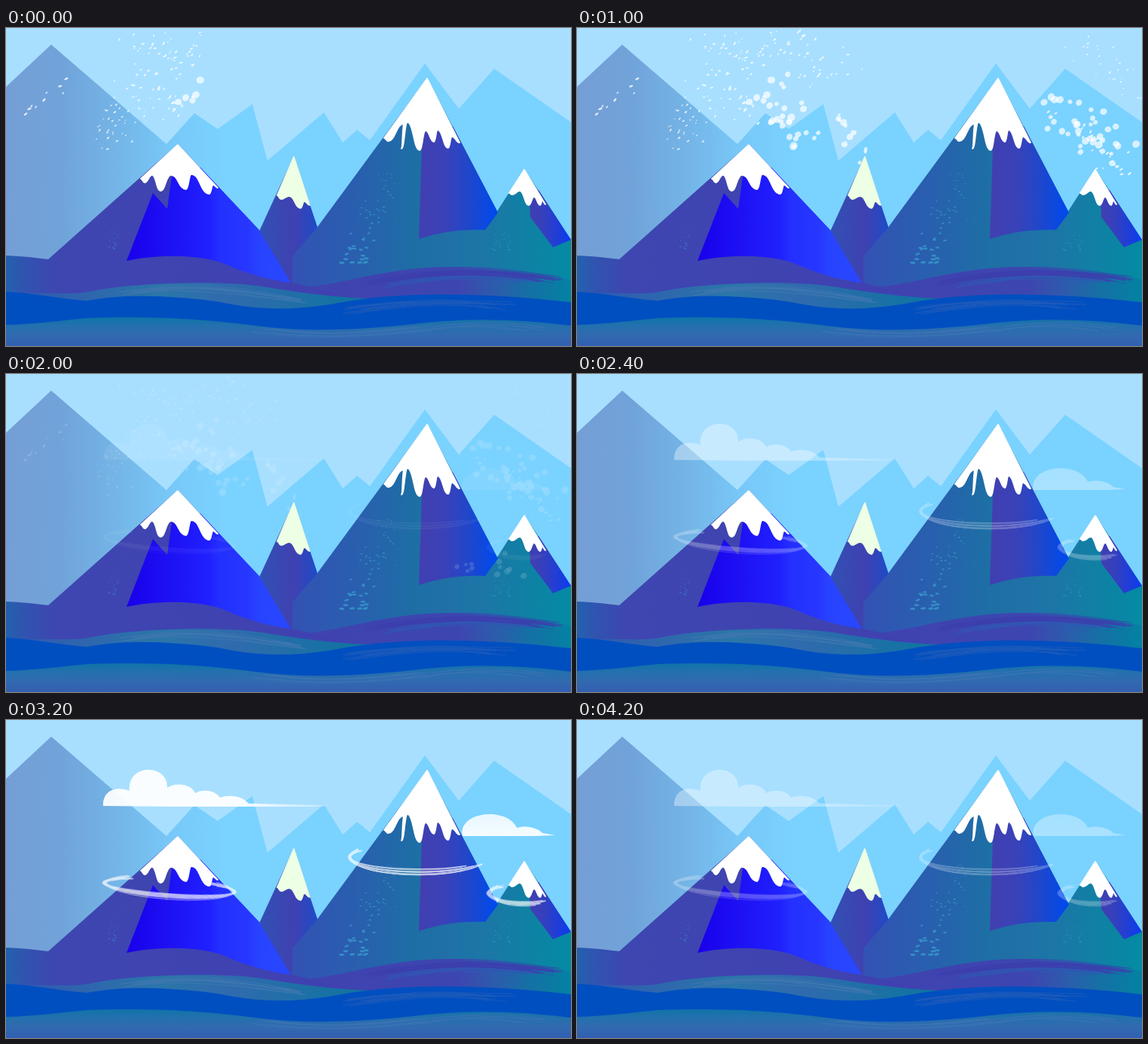
Recreate the animation shown at these times as an HTML page. Size 750 by 422 pixels, loop 4.4 s.

```html
<!DOCTYPE html>
<html lang="en">
<head>
<meta charset="utf-8">
<title>Mountains</title>
<style>
html, body { margin: 0; width: 100%; height: 100%; overflow: hidden; background: #a8dfff; }
svg { display: block; width: 750px; height: 422px; }
</style>
</head>
<body>
<svg viewBox="0 0 750 422" xmlns="http://www.w3.org/2000/svg">
  <defs id="defs"></defs>
  <rect width="750" height="422" fill="#a8dfff"/>
  <path fill="url(#range)" d="M0 78L60 22L213 154L250 113L281 134L327 101L347 176L422 112L447 152L466 135L483 149L556 47L601 107L648 54L750 125V422H0Z"/>

  <path fill="url(#mid)" d="M382 170L336 270L376 340L430 320L414 266Z"/>
  <path fill="url(#body)" d="M559 66L412 266L380 303V345H750V281L688 187L636 268L653 245Z"/>
  <path fill="url(#bigSide)" d="M553 130L548 280C580 270 605 267 636 268L653 245L593 130Z"/>
  <path fill="url(#smallSide)" d="M694 215L696 251L726 291L750 281L707 215Z"/>
  <path fill="url(#ribbon)" d="M376 346C450 342 500 317 590 317C650 316 700 322 750 334V375H376Z"/>
  <path fill="url(#left)" d="M0 302C30 303 52 307 68 308L56 307L228 154L336 268L380 338L480 362V375H0Z"/>
  <path fill="url(#face)" d="M160 309L195 219L214 240L221 190L258 185L336 268L378 338C352 335 322 327 290 313C255 299 195 301 160 309Z"/>
  <g id="caps" stroke-width="1.8" stroke-linejoin="round"></g>

  <path fill="url(#teal)" d="M20 352C60 351 90 354 110 350C170 337 290 335 340 343C400 353 440 357 480 359V382H20Z"/>
  <g id="brushBack"></g>
  <path fill="#004fc0" d="M0 350C40 352 70 359 107 362C160 352 220 355 280 363C350 378 400 372 440 365C520 350 620 350 750 364V422H0Z"/>
  <path fill="url(#front)" d="M0 394C40 393 75 388 107 385C200 382 270 387 330 395C400 404 470 401 540 393C610 384 680 386 750 395V422H0Z"/>
  <g id="brushFront"></g>
  <g id="specks" fill="#3a9fce" opacity=".75"></g>

  <g id="snow" fill="#fff"></g>
  <g id="clouds">
    <path fill="#fff" d="M129 114C128 96 143 86 164 94C162 78 173 66 189 66C205 66 215 77 214 90C226 82 246 85 251 97C260 91 279 93 284 103C296 98 316 101 323 112V114Z"/>
    <path fill="url(#tail)" d="M315 110.5L432 113.5L410 115H130L315 113Z"/>
    <path fill="url(#puff)" d="M606 154C602 137 620 125 641 125C661 125 674 133 678 143C691 139 706 143 712 150L729 153L700 154Z"/>
    <g id="rings" fill="none" stroke="#fff" stroke-linecap="round" opacity=".75"></g>
  </g>
</svg>
<script>
const $ = id => document.getElementById(id);
const clamp = v => Math.max(0, Math.min(1, v));
const mix = (a, b, t) => a + (b - a) * t;

let seed = 7;
const rnd = () => (seed = (seed * 16807) % 2147483647) / 2147483647;
const span = (a, b) => mix(a, b, rnd());
const bell = () => rnd() + rnd() - rnd() - rnd();
const repeat = (n, fn) => Array.from({ length: n }, fn).join('');

// Each stop is written offset:colour
const gradient = (id, from, to, stops, axis = 'x') => {
  const cross = axis === 'x' ? 'y' : 'x';
  const inner = stops.split(' ').map(s => {
    const [at, color] = s.split(':');
    return `<stop offset="${at}" stop-color="${color}"/>`;
  }).join('');
  return `<linearGradient id="${id}" gradientUnits="userSpaceOnUse" ${axis}1="${from}" ${axis}2="${to}" ${cross}1="0" ${cross}2="0">${inner}</linearGradient>`;
};
$('defs').innerHTML = [
  gradient('range', 0, 290, '0:#759ed6 .25:#70a3d9 .5:#74b4e6 .75:#77c8f8 1:#7ad2ff'),
  gradient('mid', 336, 414, '0:#3051b4 .58:#4041b1 1:#1d4bc8'),
  gradient('body', 380, 750, '0:#3352b4 .25:#2860ae .45:#1d6fa5 .55:#2070a7 .7:#1b77a6 1:#048ba3'),
  gradient('bigSide', 548, 650, '0:#423fb0 .35:#3942b8 .65:#1f47cb 1:#0049ed'),
  gradient('smallSide', 694, 750, '0:#423fb0 .35:#3540bd 1:#0a3bf0'),
  gradient('ribbon', 376, 750, '0:#4042b0 .6:#3d46b0 .74:#2b5dac .85:#1570a5 1:#0382a2'),
  gradient('left', 0, 400, '0:#2361ae .06:#3054b0 .16:#3e46b0 1:#4041b1'),
  gradient('face', 160, 378, '0:#1900ea .25:#1d10f4 .5:#2020fe .57:#2330ff .74:#2737ff .8:#2843ff 1:#2848ff'),
  gradient('teal', 20, 480, '0:#3158b2 .4:#2a76a9 .6:#306aae 1:#0d75a0'),
  gradient('front', 384, 422, '0:#0f74a8 .3:#2470ae .65:#3269b0 1:#315fb1', 'y'),
  gradient('tail', 315, 432, '0:#fff .4:#e6f6ff 1:#c5eaff'),
  gradient('puff', 125, 154, '0:#f1faff 1:#fff', 'y')
].join('');

// Snow cap: apex, then the turning points of the dripping edge
const cap = (apex, edge, color = '#fff') => {
  const pts = edge.split(' ').map(p => p.split(',').map(Number));
  const drips = pts.slice(1).map(([x, y], i) => {
    const [px, py] = pts[i], mx = (px + x) / 2;
    return `C${mx} ${py} ${mx} ${y} ${x} ${y}`;
  }).join('');
  return `<path fill="${color}" stroke="${color}" d="M${apex}L${pts[0]}${drips}Z"/>`;
};
$('caps').innerHTML =
  cap('382,171', '360,222 365,227 376,223 391,239 396,230 403,235', '#edffe4') +
  cap('559,67', '502,146 507,150 528,127 525,160 533,125 549,162 557,136 568,151 573,135 587,159 592,144 602,152') +
  cap('688,188', '668,219 672,221 682,216 694,235 701,224 709,235 712,229 716,234') +
  cap('228,155', '179,200 184,205 194,195 205,216 219,195 239,214 246,194 270,220 275,208 281,212');

// Dry brush: n thin waves between two points, bent up by lift
const brush = (n, x1, y1, x2, y2, lift, jitter, color) => repeat(n, () => {
  const a = mix(x1, x2, span(0, .15)), b = mix(x1, x2, span(.8, 1)), dy = bell() * jitter;
  return `<path fill="none" stroke="${color}" stroke-width="${span(.4, 1.2)}" d="M${a} ${y1 + dy}C${mix(a, b, .35)} ${y1 - lift + dy} ${mix(a, b, .65)} ${y2 - lift + bell() * jitter} ${b} ${y2 + dy}"/>`;
});
$('brushBack').innerHTML =
  brush(20, 475, 337, 740, 334, 14, 6, '#3d3fae') +
  brush(7, 500, 342, 710, 338, 12, 5, '#3058b4') +
  brush(10, 150, 351, 400, 361, 13, 5, '#3e77af');
$('brushFront').innerHTML =
  brush(12, 446, 376, 682, 370, 10, 6, '#1f5bba') +
  brush(9, 320, 402, 570, 399, -9, 5, '#3c73b4') +
  brush(5, 550, 399, 725, 400, 8, 3, '#3c73b4');

// Cloud ring: loose strokes along part of an ellipse, angles in degrees
const ring = (n, cx, cy, rx, ry, tilt, from, to) => {
  const point = (deg, rx, ry) => {
    const a = deg * Math.PI / 180;
    return `${(rx * Math.cos(a)).toFixed(1)} ${(ry * Math.sin(a)).toFixed(1)}`;
  };
  return `<g transform="translate(${cx} ${cy}) rotate(${tilt})">` + repeat(n, () => {
    const wx = rx + bell() * 3, wy = ry + bell() * 3.5;
    const a = span(from, from + 30), b = span(to - 30, to);
    return `<path stroke-width="${span(.7, 1.9)}" d="M${point(a, wx, wy)}A${wx} ${wy} 0 ${b - a > 180 ? 1 : 0} 1 ${point(b, wx, wy)}"/>`;
  }) + '</g>';
};
$('rings').innerHTML =
  ring(12, 217, 222, 86, 12, 4, -60, 240) +
  ring(12, 548, 182, 91, 20, 0, 22, 217) +
  ring(10, 685, 231, 43, 12, 2, 40, 238);

const dot = (x, y, rx, ry, turn, opacity = 1) =>
  `<ellipse rx="${rx.toFixed(2)}" ry="${ry.toFixed(2)}" transform="translate(${x.toFixed(1)} ${y.toFixed(1)}) rotate(${turn.toFixed(0)})" opacity="${opacity}"/>`;

// Flecks on a slope lean to the right and grow downwards
const flecks = (n, x, y, w, h, lean, size) => repeat(n, () => {
  const k = rnd(), r = size * mix(.3, 1, k * k);
  return dot(x + (1 - k) * lean + span(0, w), y + k * h, r * 1.4, r * .6, span(-25, 10));
});
$('specks').innerHTML =
  flecks(55, 442, 190, 40, 124, 45, 2.6) + flecks(8, 500, 195, 40, 65, 0, .8) +
  flecks(28, 131, 256, 13, 37, 13, 1) + flecks(36, 643, 240, 25, 56, 10, 1);

// The step at which a flake turns up: the left flurry sweeps right, the right one down
const sweepRight = (x, y) => Math.max(0, Math.min(2, Math.ceil((x + Math.max(0, y - 70) * .5 - 262) / 100)));
const sweepDown = (x, y) => 3 + Math.max(0, Math.min(4, Math.ceil((y - 75) / 73)));

const layers = Array(8).fill('');
const flurry = (n, x1, y1, x2, y2, spread, size, step) => {
  for (let i = 0; i < n; i++) {
    const t = rnd(), r = size * span(.5, 1);
    const x = mix(x1, x2, t) + bell() * spread, y = mix(y1, y2, t) + bell() * spread;
    const long = size > 3 ? 1.1 : 1.4;
    layers[step(x, y)] += dot(x, y, r * long, r * (2 - long) * 1.1, span(-65, -5), size > 3 ? .7 : .78);
  }
};
flurry(9, 22, 110, 85, 72, 8, 2.2, sweepRight);
flurry(55, 125, 155, 185, 70, 24, 1.6, sweepRight);
flurry(40, 165, 15, 245, 45, 24, 1.8, sweepRight);
flurry(18, 215, 65, 235, 130, 18, 2, sweepRight);
flurry(50, 255, 15, 345, 60, 35, 1.7, sweepRight);
flurry(30, 245, 75, 310, 165, 27, 5.2, sweepRight);
flurry(10, 335, 110, 390, 195, 15, 4.4, sweepRight);
flurry(35, 665, 15, 742, 80, 20, 1.3, sweepDown);
flurry(24, 630, 100, 730, 190, 24, 2, sweepDown);
flurry(38, 630, 110, 715, 165, 27, 5, sweepDown);
flurry(12, 600, 262, 690, 250, 20, 4.6, sweepDown);
$('snow').innerHTML = layers.map(s => `<g>${s}</g>`).join('');

const STEP = 200, STEPS = 22;
const snowLayers = [...$('snow').children];
const start = performance.now();
let shown = -1;

function draw(now) {
  const step = Math.floor(Math.max(0, now - start) / STEP) % STEPS;
  if (step !== shown) {
    shown = step;
    $('snow').setAttribute('opacity', clamp((11 - step) / 5));
    $('clouds').setAttribute('opacity', clamp(Math.min((step - 9.5) / 7, (STEPS - step) / 2.8)));
    snowLayers.forEach((g, i) => g.setAttribute('visibility', i <= step ? 'visible' : 'hidden'));
  }
  requestAnimationFrame(draw);
}
draw(start);
</script>
</body>
</html>
```
